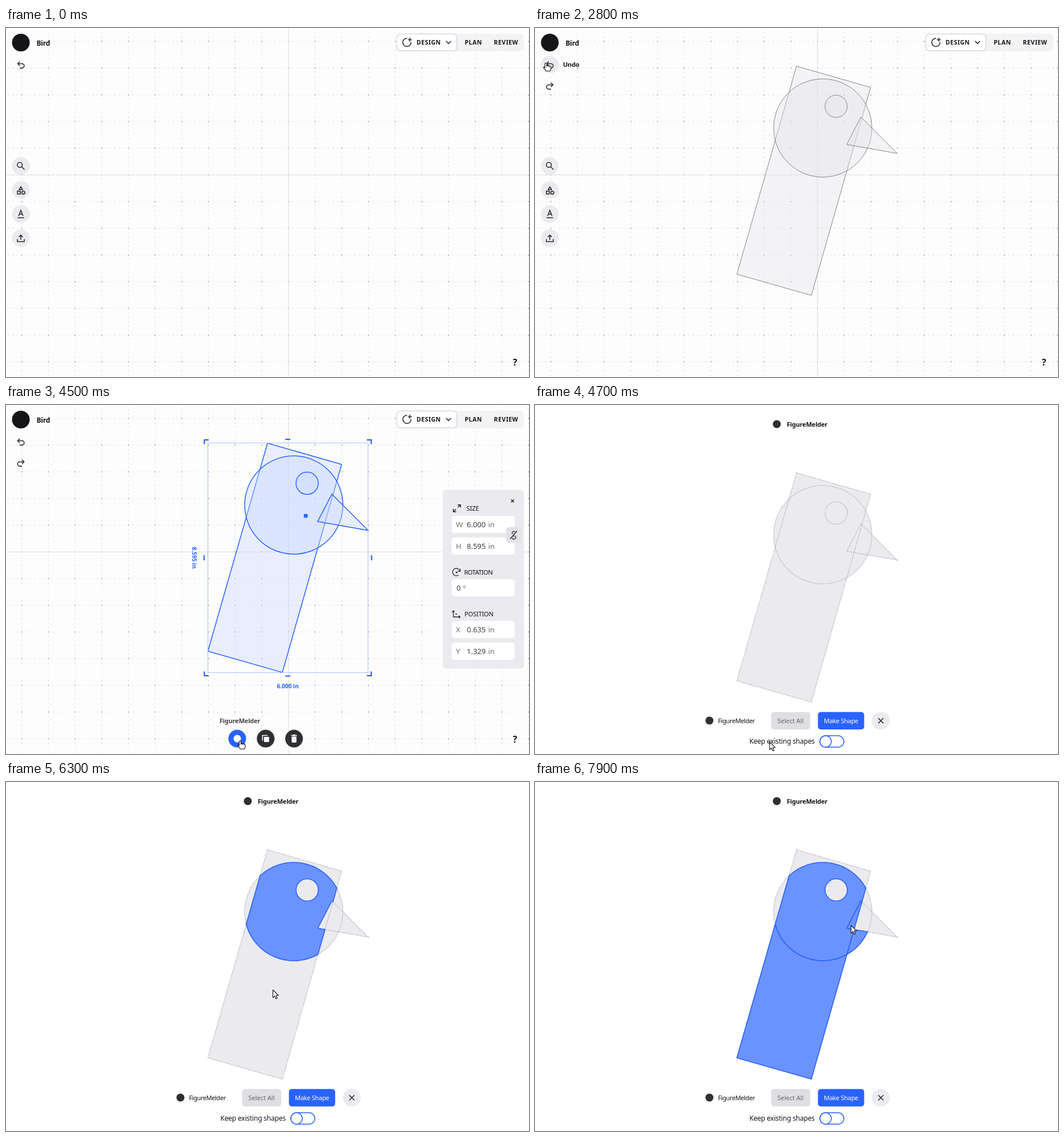
Animation, 916 px wide and 611 px high, one loop 8000 ms. Source, as an HTML page:

```html
<!DOCTYPE html>
<html lang="en">
<head>
<meta charset="utf-8">
<title>Bird</title>
<style>
  html, body { margin: 0; width: 100%; height: 100%; overflow: hidden; background: #fff; }
  svg { display: block; width: 916px; height: 611px; }
  text { font-family: "Noto Sans", "Open Sans", sans-serif; fill: #151517; }
  .line { fill: none; stroke: #2a2a2e; stroke-width: 1.6; }
  .soft { fill: #ebebef; }
  .white { fill: #fff; }
  .dark { fill: #303034; }
  .grid path { fill: none; stroke: #dcdcde; stroke-dasharray: 2.4 5.387; }
  .nav { font-size: 10.5px; font-weight: 600; letter-spacing: .5px; }
  .bold { font-size: 11px; font-weight: 600; letter-spacing: -.2px; }
  .head { font-size: 11px; }
  .value { font-size: 13px; fill: #3c3c40; }
  .unit { font-size: 13px; fill: #707076; }
  .dim { font-size: 10px; font-weight: 600; fill: #2962ff; text-anchor: middle; }
  .btn { font-size: 11px; font-weight: 500; text-anchor: middle; }
  .shapes > * { fill: rgba(228, 228, 232, .4); stroke: #85858b; stroke-width: 1; }
  .shapes.on > * { fill: rgba(200, 215, 255, .4); stroke: #2962ff; stroke-width: 1.5; }
  .mark { fill: none; stroke: #2962ff; stroke-width: 2.2; }
  .dots { fill: none; stroke: #a6a6ae; stroke-width: 1.5; stroke-dasharray: 1.5 1.9; }
  .picked path { fill: #6b93ff; fill-rule: evenodd; stroke: #2962ff; stroke-width: 1.6; stroke-linejoin: round; }
  .pointer { fill: #fff; stroke: #111; stroke-width: 1.1; stroke-linejoin: round; }
  .pointer.dart { fill: #111; stroke: #fff; stroke-width: .8; }
</style>
</head>
<body>
<svg viewBox="0 0 916 611">
  <defs>
    <path id="neckShape" d="M458 66.8L587.8 104L484 468.1L353.6 431Z"/>
    <circle id="skullShape" cx="504" cy="175.1" r="86"/>
    <path id="beakShape" d="M570.8 156L634.2 219.5L545.8 204Z"/>
    <circle id="eyeShape" cx="527.4" cy="137.1" r="19.5"/>
    <g id="outline">
      <use href="#neckShape"/><use href="#skullShape"/><use href="#beakShape"/><use href="#eyeShape"/>
    </g>
  </defs>

  <g id="editor">
    <rect width="916" height="611" fill="#fdfdfd"/>
    <g class="grid" id="grid"></g>
    <path d="M494.8 0V611M0 257.2H916" stroke="#dededf" fill="none"/>

    <g class="shapes" id="shapes">
      <use id="neck" href="#neckShape"/>
      <use id="skull" href="#skullShape"/>
      <use id="beak" href="#beakShape"/>
      <use id="eye" href="#eyeShape"/>
    </g>

    <!-- top bar -->
    <circle cx="26" cy="25.5" r="15.5" fill="#151517"/>
    <text x="53.5" y="31" font-size="12" font-weight="600" letter-spacing="-.2">Bird</text>
    <rect x="684" y="10" width="223" height="31" rx="6" fill="#f3f3f5"/>
    <rect x="684.5" y="10.5" width="105" height="29.5" rx="6" fill="#fff" stroke="#d9d9dd" stroke-width="1.4"/>
    <path class="line" d="M702.5 18A7.2 7.2 0 1 0 709.4 25M707.3 17V24M703.8 20.5H710.8"/>
    <path class="line" d="M770.8 23L775 27.3L779.2 23"/>
    <text class="nav" x="719" y="29">DESIGN</text>
    <text class="nav" x="803.5" y="29">PLAN</text>
    <text class="nav" x="854.5" y="29">REVIEW</text>

    <!-- side tools -->
    <g id="undoHover">
      <circle class="soft" cx="26" cy="64" r="15.5"/>
      <text class="bold" x="49" y="68">Undo</text>
    </g>
    <path class="line" d="M24.2 58.8L20.5 62.5L24.2 66.2M20.5 62.5H28A3.8 3.8 0 0 1 28 70.1H24"/>
    <path id="redo" class="line" d="M27.8 95.8L31.5 99.5L27.8 103.2M31.5 99.5H24A3.8 3.8 0 0 0 24 107.1H28"/>
    <g id="tools">
      <g class="soft">
        <circle cx="26" cy="241.5" r="15.5"/><circle cx="26" cy="283.5" r="15.5"/>
        <circle cx="26" cy="325.8" r="15.5"/><circle cx="26" cy="368" r="15.5"/>
      </g>
      <g class="line">
        <circle cx="24.2" cy="239.6" r="4.4"/>
        <path d="M27.5 243L32.5 248"/>
        <path d="M26 278L29 283H23Z"/>
        <rect x="20" y="285.6" width="5" height="5"/>
        <circle cx="30.3" cy="288.2" r="2.7"/>
        <path d="M22.2 329L26 319.3L29.8 329M23.5 326H28.5M20.3 332.2H31.7"/>
        <path d="M26 371V363M22.5 366L26 362.6L29.5 366M20 369.5V374H32V369.5"/>
      </g>
    </g>
    <text x="891.5" y="590.5" font-size="16" font-weight="700" text-anchor="middle">?</text>

    <!-- selection -->
    <g id="selection">
      <rect x="353.5" y="66.5" width="280.5" height="402" fill="none" stroke="#a9c3f8"/>
      <path class="mark" d="M347.4 68.5V61.2H355M632 61.2H639.7V68.5M347.4 466.5V473.8H355M632 473.8H639.7V466.5M489 60.2H498M489 474.5H498M347 263V272M640.3 263V272"/>
      <rect x="521.7" y="190.8" width="6.5" height="6.5" fill="#2962ff"/>
      <text class="dim" x="493.5" y="495.5">6.000 in</text>
      <text class="dim" transform="translate(326 267.5) rotate(90)">8.595 in</text>

      <rect class="soft" x="765" y="148.5" width="142" height="313" rx="6"/>
      <path class="line" d="M884.7 165.5L889.7 170.5M889.7 165.5L884.7 170.5"/>
      <g class="line">
        <path d="M784 186.5L788 182.5M791.5 179L795.5 175M783.5 182V187H788.5M791 174.8H796V179.5"/>
        <path d="M792.5 297.8A6.5 6.5 0 1 1 795 291M795.5 286.5V291.2H791" stroke-width="1.3"/>
        <circle cx="789" cy="293" r=".8"/>
        <path d="M783.5 361V371H795M781.5 362.5L783.5 360L785.5 362.5M793 368.8L795.3 371L793 373.2M787 366H790" stroke-width="1.3"/>
      </g>
      <text class="head" x="806.5" y="185">SIZE</text>
      <text class="head" x="802.5" y="297" letter-spacing="-.5">ROTATION</text>
      <text class="head" x="803" y="370" letter-spacing="-.15">POSITION</text>
      <g id="fields"></g>
      <rect x="875.5" y="213.5" width="27" height="28" rx="5" fill="#e3e3e7"/>
      <path class="line" style="stroke-width:1.3" d="M883 234.5L895 220.5M886.5 226V224A3 3 0 0 1 892 222.5M892.5 229V231A3 3 0 0 1 886.5 232.5M889.5 225V231"/>
    </g>

    <!-- action buttons -->
    <g id="actions" transform="translate(0 -.4)">
      <g>
        <circle id="mixer" class="dark" cx="405" cy="584.5" r="15.5"/>
        <circle class="white" cx="405" cy="584.5" r="6.5"/>
      </g>
      <g>
        <circle class="dark" cx="454.8" cy="584.5" r="15.5"/>
        <path d="M449.3 588V579H458.3" fill="none" stroke="#fff" stroke-width="1.5"/>
        <rect class="white" x="451.8" y="581.3" width="9" height="9" rx="1"/>
      </g>
      <g>
        <circle class="dark" cx="504.5" cy="584.5" r="15.5"/>
        <path class="white" d="M499.5 578.2H502.5L503.3 577.2H505.7L506.5 578.2H509.5V579.8H499.5ZM500.3 581H508.7V590Q508.7 591.3 507.4 591.3H501.6Q500.3 591.3 500.3 590Z"/>
      </g>
    </g>
    <text id="tip" class="bold" x="374" y="557" style="fill:#424247">FigureMelder</text>
  </g>

  <g id="melder">
    <rect class="white" width="916" height="611"/>
    <circle class="dark" cx="423.5" cy="33.5" r="7"/>
    <text class="bold" x="441" y="38">FigureMelder</text>

    <g transform="translate(0 52)">
      <use href="#outline" class="soft"/>
      <use href="#outline" class="dots"/>
    </g>
    <g class="picked" id="picked">
      <path d="M445.1 164A86 86 0 0 1 579.5 185.7L572.7 209.7L571 208L546 256L558.8 258.2L546.4 301.8A86 86 0 0 1 420.7 249ZM508 189a19.5 19.5 0 1 0 39 0a19.5 19.5 0 1 0 -39 0Z"/>
      <path d="M420.7 249L353.5 483L484 520L546.4 301.8A86 86 0 0 1 420.7 249Z"/>
      <path d="M558.8 258.2L582.4 262.2A86 86 0 0 1 546.4 301.8Z"/>
      <path d="M571 208L572.7 209.7L558.8 258.2L546 256Z"/>
    </g>

    <circle class="dark" cx="305.5" cy="552.5" r="7"/>
    <text class="bold" x="320.5" y="556.5" style="font-weight:500;letter-spacing:-.4px">FigureMelder</text>
    <rect x="413.5" y="537.5" width="68.5" height="30.5" rx="5" fill="#dedee3"/>
    <text class="btn" x="447.5" y="556.5" style="fill:#66666c">Select All</text>
    <rect x="495.5" y="537.5" width="81" height="30.5" rx="5" fill="#2962ff"/>
    <text class="btn" x="536" y="556.5" style="fill:#fff" letter-spacing="-.3">Make Shape</text>
    <circle class="soft" cx="605.7" cy="552.8" r="15.5"/>
    <path class="line" d="M601.2 548.3L610.2 557.3M610.2 548.3L601.2 557.3"/>
    <text x="375.5" y="593" font-size="12" letter-spacing="-.2">Keep existing shapes</text>
    <rect x="499" y="579" width="42" height="20" rx="10" fill="#fff" stroke="#2962ff" stroke-width="1.5"/>
    <circle cx="509" cy="589" r="10" fill="#fff" stroke="#2962ff" stroke-width="1.5"/>
  </g>

  <path id="cursor" class="pointer"/>
</svg>
<script>
const LOOP = 8000, STEP = 100, CELL = 46.72;
const $ = id => document.getElementById(id);
const clamp = (v, lo = 0, hi = 1) => Math.min(hi, Math.max(lo, v));
const show = (el, on) => { el.style.display = on ? '' : 'none'; };

function buildGrid() {
  let lines = '', dots = '';
  for (let i = -10; i <= 9; i++) {
    const x = 494.8 + i * CELL;
    lines += `M${x} ${257.2 - 6 * CELL - 1.2}V611`;
    for (let j = -5; j <= 7; j++) dots += `<circle cx="${x}" cy="${257.2 + j * CELL}" r="1" fill="#9c9ca0"/>`;
  }
  for (let j = -5; j <= 7; j++) lines += `M${494.8 - 11 * CELL - 1.2} ${257.2 + j * CELL}H916`;
  $('grid').innerHTML = `<path d="${lines}"/>${dots}`;
}

function buildFields() {
  const rows = [[194, 'W', '6.000'], [232, 'H', '8.595'], [305, '', '0'], [378, 'X', '0.635'], [416, 'Y', '1.329']];
  $('fields').innerHTML = rows.map(([y, name, value]) => `
    <rect class="white" x="780.5" y="${y}" width="110.5" height="30" rx="5"/>
    <text class="unit" x="788" y="${y + 20}">${name}</text>
    <text class="value" x="${name ? 807 : 789}" y="${y + 20}">${value}</text>
    <text class="unit" x="${name ? 844.5 : 800.5}" y="${y + 20}">${name ? 'in' : 'º'}</text>`).join('');
}

const hand = top => `M-1.5 9V${top + 1.5}a1.5 1.5 0 0 1 3 0V6c0-1.5 3-1.4 3 0c0-1.2 2.4-1 2.4.4c.3-1 2-.8 2 .6V10.5c0 1.8-1.2 2.2-1.2 3.8H0C0 12-2.8 10.8-3.8 8.6c-.6-1.6 1-2 2.3-.2`;
const ARROW = 'M0 0V13.6L3.2 10.7L5.4 15.6L7.6 14.6L5.5 9.8H9.8Z';
const DART = 'M0 0L9.2 5.4L5.2 6.9L3.4 11Z';

// time, x, y
const route = [
  [600, 19, 61], [3100, 19, 61], [3200, 236.5, 303.5], [3300, 238, 305], [4100, 409, 587], [4500, 410, 588],
  [4700, 411, 590], [4800, 411, 590], [5700, 496, 283], [5800, 496, 283],
  [6300, 467.5, 364], [6400, 468, 364], [6700, 539, 286], [7100, 564, 274],
  [7300, 565, 273], [7600, 554, 254], [7700, 553.5, 251], [8000, 553.5, 251]
];

function place(t) {
  const n = Math.max(1, route.findIndex(p => p[0] > t));
  const [a, b] = [route[n - 1], route[n]];
  const p = clamp((t - a[0]) / (b[0] - a[0]));
  const e = p * p * (3 - 2 * p);
  return [a[1] + (b[1] - a[1]) * e, a[2] + (b[2] - a[2]) * e];
}

function drawCursor(t) {
  const el = $('cursor'), dart = t >= 3200 && t < 4100;
  const pressed = t >= 1000 && t < 2800;
  show(el, t >= 600);
  el.setAttribute('d', t >= 4700 ? ARROW : dart ? DART : hand(pressed ? 2 : 0));
  el.classList.toggle('dart', dart);
  el.setAttribute('transform', `translate(${place(t)})`);
}

const starts = { skull: 1000, redo: 1000, neck: 1500, beak: 2000, eye: 2700, selection: 3200, actions: 3200, melder: 4700 };
const picks = [5900, 6400, 7200, 7800];

function render(t) {
  const selected = t >= 3200;
  for (const id in starts) show($(id), t >= starts[id]);
  show($('undoHover'), t >= 600 && !selected);
  show($('tools'), !selected);
  $('shapes').classList.toggle('on', selected);

  [...$('actions').children].forEach((button, i) => {
    const late = clamp(i - (t - 3200) / 100, 0, 2);
    button.setAttribute('transform', `translate(0 ${late * 21})`);
    button.style.opacity = 1 - late * .3;
  });
  const hover = clamp((t - 4000) / 400);
  $('tip').style.opacity = hover;
  $('mixer').style.fill = `color-mix(in srgb, #2962ff ${hover * 100}%, #303034)`;

  [...$('picked').children].forEach((part, i) => show(part, t >= picks[i]));
  drawCursor(t);
}

function tick() {
  // the picture advances ten times a second
  render(Math.floor(performance.now() % LOOP / STEP) * STEP);
  requestAnimationFrame(tick);
}

buildGrid();
buildFields();
tick();
</script>
</body>
</html>
```
